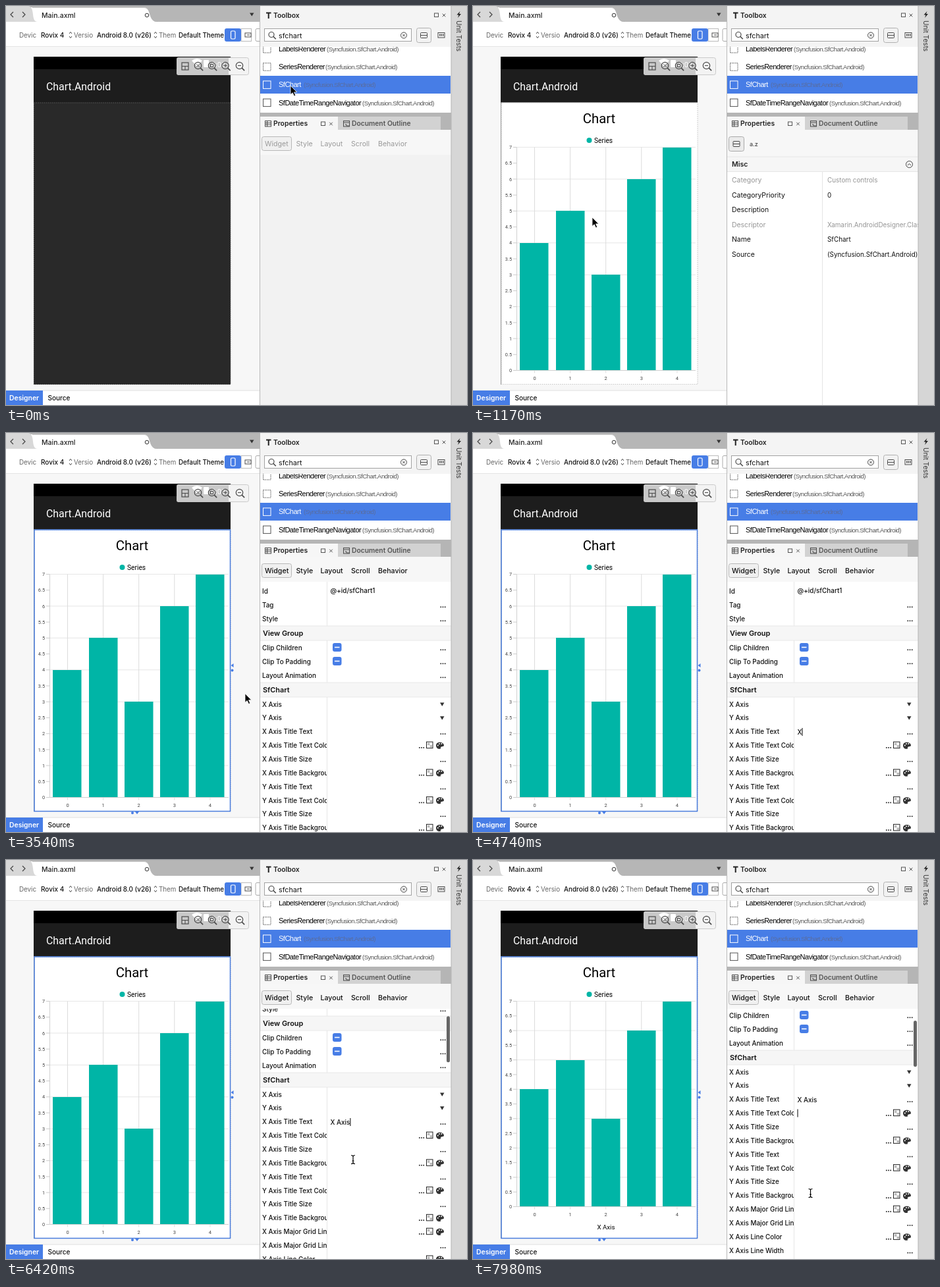
An HTML page for the animation above (8000 ms loop, 700x606 px).

```html
<!DOCTYPE html>
<html lang="en">
<head>
<meta charset="utf-8">
<title>Chart designer</title>
<style>
html, body { margin: 0; width: 100%; height: 100%; overflow: hidden; background: #f6f6f6; }
svg { display: block; }
text { font-family: Inter, "Open Sans", sans-serif; white-space: pre; }
.rob { font-family: Roboto, sans-serif; }
.lib { font-family: "Liberation Sans", Arial, sans-serif; letter-spacing: -.5px; }
#widget text { font-weight: 500; }
#widget .head { font-weight: 600; }
</style>
</head>
<body>
<script>
const BLUE = '#477de6', TEAL = '#00b5a6', DARK = '#4a4a4a', INK = '#111';

const rect = (x, y, w, h, fill, more = '') =>
  `<rect x="${x}" y="${y}" width="${w}" height="${h}" fill="${fill}" ${more}/>`;
const text = (x, y, s, size = 10, fill = INK, more = '') =>
  `<text x="${x}" y="${y}" font-size="${size}" fill="${fill}" ${more}>${s}</text>`;
const path = (d, stroke = DARK, more = '') =>
  `<path d="${d}" fill="none" stroke="${stroke}" ${more}/>`;
const shape = (d, fill) => `<path d="${d}" fill="${fill}"/>`;
const circle = (x, y, r, fill, more = '') =>
  `<circle cx="${x}" cy="${y}" r="${r}" fill="${fill}" ${more}/>`;
const group = (id, s) => `<g id="${id}">${s}</g>`;
const clip = (x, y, w, h, s) =>
  `<svg x="${x}" y="${y}" width="${w}" height="${h}" viewBox="${x} ${y} ${w} ${h}">${s}</svg>`;
const bold = 'font-weight="600"', medium = 'font-weight="500"', middle = 'text-anchor="middle"';
const cross = (x, y, r, color = '#555') =>
  path(`M${x - r} ${y - r}l${2 * r} ${2 * r}m0 ${-2 * r}l${-2 * r} ${2 * r}`, color);
const glass = (x, y, r) =>
  circle(x, y, r, 'none', `stroke="${DARK}" stroke-width="1.2"`) +
  path(`M${x + r * .7} ${y + r * .7}l4 4`, DARK, 'stroke-width="1.6"');
const updown = x => path(`M${x - 2} 42l2 -2.5 2 2.5M${x - 2} 46l2 2.5 2 -2.5`, '#444');
const listIcon = (x, y) =>
  rect(x - 5, y - 4, 10, 8, 'none', `stroke="${DARK}" rx="1"`) + path(`M${x - 5} ${y}h10`);

function leftPane() {
  return rect(0, 0, 385, 606, '#f7f7f7') + rect(0, 0, 385, 24, '#b6b6b6') +
    shape('M0 2H209C222 2 215 24 230 24H0Z', '#fff') +
    shape('M0 0H34C45 2 37 24 48 24H0Z', '#d8d8d8') +
    path('M40 2.500H209C222 2 215 24 230 24', '#a9a9a9', 'stroke-width=".6"') +
    rect(0, 24, 385, 38, '#fff') + path('M0 61.5H385', '#e4e4e4') +
    path('M11 9l-4 4 4 4M25 9l4 4 -4 4', '#444', 'stroke-width="1.2"') +
    text(54, 17.5, 'Main.axml', 10.5, '#222', medium) +
    circle(214, 14, 2.8, 'none', 'stroke="#333"') + shape('M370 10.5h6.5l-3.25 5Z', '#333') +
    text(20, 48, 'Devic', 9.8, '#666') + text(53, 48, 'Rovix 4', 10, INK, medium) + updown(98) +
    text(103, 48, 'Versio', 9.8, '#666') + text(138, 48, 'Android 8.0 (v26)', 9.9, INK, medium) + updown(227) +
    text(232, 48, 'Them', 9.8, '#666') + text(262, 48, 'Default Theme', 9.8, INK, medium) +
    rect(357, 34.5, 15.5, 19, '#fff', 'stroke="#bbb"') + rect(332, 34, 25, 20, BLUE, 'rx="3"') +
    rect(341.5, 38, 6.5, 12, 'none', 'stroke="#fff" stroke-width="1.2" rx="1.5"') +
    rect(363, 41, 9, 6, 'none', `stroke="${DARK}"`) + path('M366 44h4', DARK) +
    path('M385 34.5H381a2 2 0 0 0 -2 2V51.5a2 2 0 0 0 2 2H385', '#aaa') +
    rect(0, 584, 385, 22, '#fff') + path('M0 584H385', '#e0e0e0') + rect(0, 584, 56, 22, BLUE) +
    text(5, 598.5, 'Designer', 10.4, '#fff', bold) + text(63.5, 598.5, 'Source', 10, INK, medium);
}

function device() {
  return rect(42, 77, 299, 498, '#292929') + rect(42, 77, 299, 19, '#000') +
    rect(42, 96, 299, 50.5, '#1d1d1d') + text(61, 127.5, 'Chart.Android', 15.9, '#fff', 'class="rob"');
}

function zoomBar() {
  let s = rect(259, 78, 82, 27, '#c9c9c9', 'rx="3"') + rect(338, 78, 31, 27, '#f3f3f3', 'rx="3"') +
    shape('M282 83Q290 77 298 83L290 92Z', '#fff') + rect(300, 82, 8, 11, '#fff', 'rx="1"') +
    text(312, 93, '8:00', 11, '#fff', 'class="rob"') +
    rect(259.5, 78.5, 109, 26, 'none', 'rx="3" stroke="#cacaca"') +
    rect(267, 86, 10, 11, 'none', `stroke="${DARK}" stroke-width="1.2"`) + path('M267 91.5h10M272 91.5v5.5');
  for (const x of [291.5, 312.5, 333, 354.5]) s += glass(x, 90.5, 5.2);
  return s + cross(291.5, 90.5, 2.2, DARK) + rect(310.5, 88.5, 4, 4, 'none', `stroke="${DARK}"`) +
    path('M330.5 90.5h5m-2.5 -2.5v5M352 90.5h5');
}

function chart(bottom, title) {
  const top = 214.5, unit = (bottom - top) / 7, values = [4, 5, 3, 6, 7];
  let s = rect(42.5, 146.5, 298.5, 428.5, '#fff') +
    rect(43, 147, 298, 427.5, 'none', 'stroke="#aaa" stroke-width=".7" stroke-dasharray="1.5 1.5"') +
    text(191.5, 178, 'Chart', 20.3, '#000', `class="rob" ${middle}`) +
    circle(176.5, 204, 4, TEAL) + text(184, 207.7, 'Series', 10.2, '#000', 'class="rob"');
  for (let v = 0; v <= 7; v += .5) {
    const y = bottom - v * unit;
    if (v % 1 == 0) s += path(`M66 ${y}H338`, '#e6e6e6');
    s += path(`M61 ${y}h5`, '#ccc') + text(59, y + 2.7, v, 7.3, '#444', 'class="rob" text-anchor="end"');
  }
  values.forEach((v, i) => {
    const x = 93.5 + i * 54.1, y = Math.round(bottom - v * unit);
    s += path(`M${x} ${top}V${bottom + 4}`, '#dcdcdc') +
      rect(Math.round(71.4 + i * 54.2), y, 43.5, Math.round(bottom) - y, TEAL) +
      text(x, bottom + 14.5, i, 7.5, '#444', `class="rob" ${middle}`);
  });
  return s + path(`M66.5 ${top}V${bottom}H338`, '#d0d0d0') +
    (title ? text(202, 561, title, 9.7, '#000', `class="rob" ${middle}`) : '');
}

const handle = (x, y, w, h) => rect(x, y, w, h, '#d8e3f8', 'stroke="#5f83c4" stroke-width=".8"');
const outline = rect(43, 147, 297.5, 427.5, 'none', 'stroke="#4a7ddd" stroke-width="1.5"');
const handles = handle(187, 145, 9, 3) + handle(187, 573, 9, 3) + handle(41.5, 357, 3, 6) + handle(339, 357, 3, 6);
const anchors = shape('M345.5 350v6l-4 -3Z', BLUE) + circle(343.5, 360.5, 2, BLUE) +
  circle(192, 577, 2, BLUE) + shape('M196 575h6l-3 4Z', BLUE);

function toolbox() {
  const space = '(Syncfusion.SfChart.Android)';
  const items = [['LabelsRenderer', 487], ['SeriesRenderer', 485], ['SfChart', 452], ['SfDateTimeRangeNavigator', 541]];
  const rows = items.map(([name, x], i) => {
    const y = 65.5 + i * 27.2, on = i == 2, frame = on ? '#fff' : '#555';
    return (on ? rect(386, 106, 289, 27, BLUE) : '') +
      rect(390.5, y - 6, 11.5, 11.5, 'none', `stroke="${frame}" ${i < 2 ? 'stroke-dasharray="1.5 1"' : ''}`) +
      text(414, y + 3.5, name, 11, on ? '#fff' : '#000', 'class="lib"') +
      text(x, y + 3.5, space, 9.5, on ? '#5a6c9c' : '#555', 'class="lib"');
  }).join('');
  return rect(385, 0, 291, 606, '#f4f4f4') +
    path('M395 10.5h7.5M398.7 10v9', '#222', 'stroke-width="2"') + text(406, 17.5, 'Toolbox', 10.3, '#222', bold) +
    rect(650.5, 11, 6, 5.5, 'none', 'stroke="#555"') + cross(665, 14, 2.3) +
    rect(392.5, 34.5, 223, 19, '#fff', 'stroke="#a2a2a2"') + glass(403, 43.5, 4) +
    text(414, 48.5, 'sfchart', 10.7) + circle(604, 44.5, 4.5, 'none', 'stroke="#444"') + cross(604, 44.5, 1.8, '#444') +
    rect(623.5, 33.5, 22, 22, '#f2f2f2', 'stroke="#b0b0b0" rx="3"') + listIcon(634.5, 44.5) +
    rect(656, 40.5, 10, 7.5, 'none', `stroke="${DARK}"`) + path('M658 44h7', DARK, 'stroke-dasharray="1.5 1" stroke-width="3"') +
    rect(386, 62, 290, 100, '#fff') + clip(386, 62, 290, 100, rows) +
    rect(385, 162, 291, 26, '#b5b5b5') + rect(386, 168, 118, 20, '#f6f6f6') + rect(504, 168, 156, 20, '#d2d2d2') +
    rect(393.5, 174.5, 9, 8.5, 'none', `stroke="${DARK}"`) + path('M396.5 174.5v8.5M394 177.5h8M394 180h8') +
    text(406, 182.3, 'Properties', 10.4, '#222', bold) +
    rect(478.5, 176, 6, 5.5, 'none', 'stroke="#555"') + cross(493.5, 179, 2.3) +
    rect(512.5, 174.5, 9, 8.5, 'none', `stroke="${DARK}"`) + path('M513 177h8M515 180h2v2h4') +
    text(525, 182.3, 'Document Outline', 10.3, '#555', bold) + path('M385.5 0V606', '#b8b8b8');
}

const dock = rect(676, 0, 24, 606, '#d6d6d6') + path('M676 0V606', '#b4b4b4') +
  shape('M689.5 8l-5 5.5h3l-1.5 4.5 5 -6h-3Z', '#222') +
  text(0, 0, 'Unit Tests', 10, '#333', 'transform="translate(683.5 22) rotate(90)"');

function tabs(color) {
  const names = { Widget: 393, Style: 440.5, Layout: 477.5, Scroll: 524, Behavior: 565 };
  return rect(386, 188, 290, 38, '#f7f7f7') +
    rect(388.5, 198.5, 45, 21, '#f0f0f0', 'rx="3" stroke="#b8b8b8"') +
    Object.entries(names).map(([n, x]) => text(x, 213.3, n, 10.6, color)).join('');
}

function miscPanel() {
  const rows = [['Category', 'Custom controls', 1], ['CategoryPriority', '0'], ['Description', ''],
    ['Descriptor', 'Xamarin.AndroidDesigner.Class', 1], ['Name', 'SfChart'], ['Source', '(Syncfusion.SfChart.Android)']];
  const body = rows.map(([k, v, dim], i) => {
    const y = 268 + i * 22.6, color = dim ? '#959595' : INK;
    return text(393, y, k, 10.4, color) + text(538, y, v, 9.9, color);
  }).join('');
  return rect(386, 188, 290, 418, '#fff') + rect(386, 188, 290, 41, '#f7f7f7') +
    rect(388.5, 198.5, 23, 22, '#ebebeb', 'rx="3" stroke="#aaa"') + listIcon(400, 209.5) +
    text(420, 213, 'a.z', 9, '#444', medium) +
    rect(386, 229, 290, 23, '#f6f6f6') + path('M386 229H676M386 251.5H676', '#e6e6e6') +
    text(393, 244.3, 'Misc', 10.6, '#222', bold) +
    circle(662.5, 240.5, 5, 'none', 'stroke="#444"') + path('M660 242l2.5 -2.5 2.5 2.5', '#444') +
    path('M530.5 252V606', '#e4e4e4') + clip(386, 252, 290, 354, body);
}

const dots = (x, y) => [0, 3.2, 6.4].map(d => rect(x + d, y, 1.6, 1.6, '#111')).join('');
const colorTools = y => dots(627, y + 2.5) +
  rect(638.5, y - 5.5, 9.5, 9.5, '#fff', 'stroke="#222"') + rect(640, y - 4, 3.5, 3.5, '#bbb') + rect(643.5, y - .5, 3.5, 3.5, '#bbb') +
  shape(`M653 ${y}C653 ${y - 7} 665 ${y - 6} 665 ${y}C665 ${y + 3} 659 ${y} 660 ${y + 5}C656 ${y + 6} 653 ${y + 4} 653 ${y}Z`, '#333') +
  [[655.8, 0], [658, -2.7], [661.3, -2.5]].map(([x, d]) => circle(x, y + d, 1, '#fff')).join('');
const check = y => rect(496, y - 6.5, 13.5, 13, BLUE, 'rx="3"') + path(`M499 ${y}h7.5`, '#fff', 'stroke-width="1.6"');

// Row kinds: h header, d dots, b checkbox, m menu, c colour
function propertyRows() {
  const first = [['Id', 240, ''], ['Tag', 261, 'd'], ['Style', 282, 'd'], ['View Group', 304, 'h'],
    ['Clip Children', 326, 'b'], ['Clip To Padding', 347, 'b'], ['Layout Animation', 368, 'd'], ['SfChart', 390, 'h']];
  const list = ['X Axis m', 'Y Axis m'];
  for (const a of ['X', 'Y'])
    list.push(`${a} Axis Title Text d`, `${a} Axis Title Text Color c`, `${a} Axis Title Size d`, `${a} Axis Title Background c`);
  list.push('X Axis Major Grid Line Color c', 'X Axis Major Grid Line Width d', 'X Axis Line Color c', 'X Axis Line Width d', 'Y Axis Line Color c');
  const rows = first.concat(list.map((s, i) => [s.slice(0, -2), 412 + i * 20.87, s.slice(-1)]));
  return rows.map(([name, y, kind]) => {
    if (kind == 'h')
      return rect(386, y - 11, 290, 22, '#f6f6f6') + path(`M386 ${y - 11}h290m0 22h-290`, '#e8e8e8') +
        text(390, y + 3.5, name, 10.9, INK, 'class="head"');
    let s = clip(386, y - 9, 101, 18, text(389, y + 3.5, name, 9.9));
    if (kind == 'b') s += check(y - .5);
    if (kind == 'c') s += colorTools(y);
    if (kind == 'd' || kind == 'b') s += dots(659.5, y + 2.5);
    if (kind == 'm') s += shape(`M659 ${y - 2.5}h6.5l-3.25 5.5Z`, '#333');
    return s;
  }).join('') + text(492.5, 243.3, '@+id/sfChart1', 9.9);
}

const widgetPanel = tabs(INK) + rect(386, 226, 290, 380, '#fff') + path('M487.5 226V606', '#e6e6e6') +
  clip(386, 226, 290, 380, group('list', propertyRows() +
    text(492.5, 457.5, '', 9.9, INK, 'id="typed"') + rect(0, -6, 1, 12, '#000', 'id="caret"'))) +
  rect(669, 0, 5, 70, '#666', 'id="thumb" rx="2.5"');

const arrow = '<path d="M0 0V13.5L3.2 10.7 5.5 15.8 7.7 14.8 5.5 9.9H9.8Z" stroke="#fff" stroke-width=".8"/>';
const beamLine = 'M-3 -6.5Q0 -6.5 0 -4.5Q0 -6.5 3 -6.5M0 -4.5V4.5M-3 6.5Q0 6.5 0 4.5Q0 6.5 3 6.5M-1.5 2H1.5';
const beam = path(beamLine, '#fff', 'stroke-width="2.6"') + path(beamLine, '#000', 'stroke-width="1.2"');

document.body.innerHTML = '<svg width="700" height="606" viewBox="0 0 700 606">' +
  leftPane() + device() +
  group('empty', rect(42.5, 147, 298.5, 427.5, 'none', 'stroke="#666" stroke-width=".8" stroke-dasharray="1.5 1.5"')) +
  group('plain', chart(553.5)) + group('titled', chart(526.5, 'X Axis')) +
  group('outline', outline) + group('handles', handles) + group('anchors', anchors) +
  zoomBar() + toolbox() +
  group('idle', rect(386, 188, 290, 418, '#f2f2f2') + tabs('#999')) +
  group('misc', miscPanel()) + group('widget', widgetPanel) + dock +
  group('arrow', arrow) + group('beam', beam) + '</svg>';

const el = id => document.getElementById(id);
const show = (id, on) => el(id).setAttribute('display', on ? 'inline' : 'none');
const move = (id, x, y) => el(id).setAttribute('transform', `translate(${x} ${y})`);

// Keys are [time, value, ...]; glide eases each step
function at(keys, t, col = 1, glide = true) {
  const n = keys.findIndex(k => k[0] > t);
  if (n < 0) return keys[keys.length - 1][col];
  if (n == 0) return keys[0][col];
  const a = keys[n - 1], b = keys[n];
  let u = (t - a[0]) / (b[0] - a[0]);
  if (glide) u = u * u * (3 - 2 * u);
  return a[col] + (b[col] - a[col]) * u;
}

const pointer = [[150, 432, 121], [780, 181, 321], [2200, 181, 321], [2440, 206, 339], [3270, 206, 339],
  [3820, 527, 455], [6900, 527, 455], [7300, 514, 476], [7380, 514, 476], [7590, 512.5, 506]];
const scrolling = [[6060, 0], [6400, 56], [7300, 56], [7380, 65.5], [7580, 90]];
const keyTimes = [4650, 4890, 4980, 5190, 5320, 5450];
const CHART = 900, SELECT = 2520, FOCUS = 3900, COMMIT = 7050;

function draw(t) {
  const x = at(pointer, t), y = at(pointer, t, 2), scroll = at(scrolling, t, 1, t < 7000);
  const selected = t >= SELECT, done = t >= COMMIT;
  show('empty', t < CHART);
  show('plain', t >= CHART && !done);
  show('titled', done);
  show('outline', selected);
  show('handles', selected && t < 2900);
  show('anchors', t >= 2900);
  show('idle', t < 100);
  show('misc', t >= 100 && !selected);
  show('widget', selected);

  const typed = el('typed');
  typed.textContent = 'X Axis'.slice(0, keyTimes.filter(k => k <= t).length);
  const width = !done && typed.textContent ? typed.getComputedTextLength() : 0;
  show('caret', t >= FOCUS);
  move('caret', 492.5 + width, done ? 474.5 : 454);
  move('list', 0, -scroll);
  show('thumb', t >= 6060);
  move('thumb', 0, 226 + scroll * .2);

  const hidden = t >= 4650 && t < 6000, overField = x > 487 && t > 3270;
  show('arrow', !hidden && !overField);
  show('beam', !hidden && overField);
  move('arrow', x, y);
  move('beam', x, y);
}

function frame() {
  draw(performance.now() % 8000);
  requestAnimationFrame(frame);
}
frame();
</script>
</body>
</html>
```
